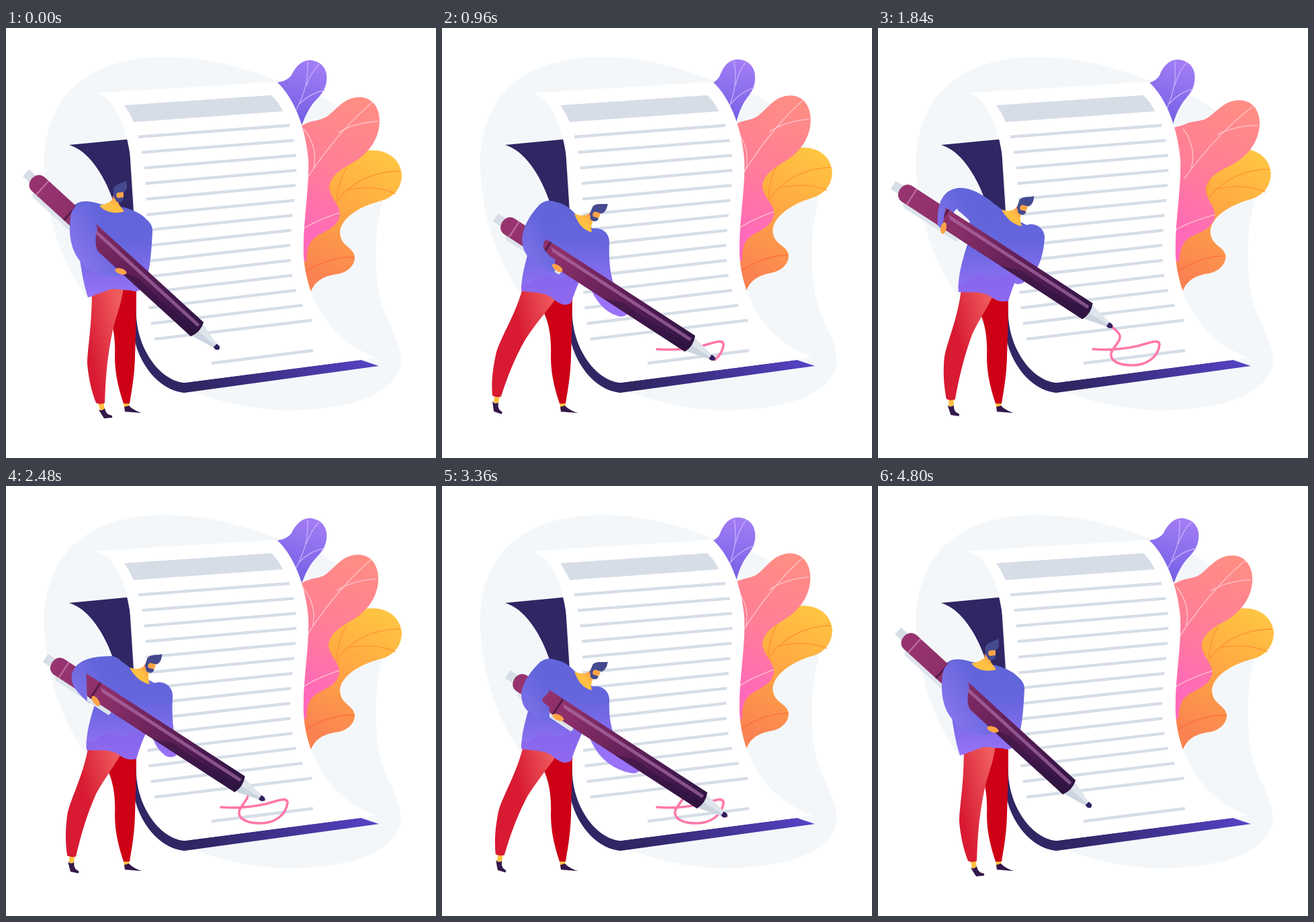
Recreate the animation shown at these times as an HTML page. Size 640x640 px, loop 4840 ms.

```html
<!DOCTYPE html>
<html lang="en">
<head>
<meta charset="utf-8">
<title>Signing a document</title>
<style>
html, body { margin: 0; width: 100%; height: 100%; overflow: hidden; background: #fff; }
svg { display: block; width: 100vw; height: 100vh; }
.vein { fill: none; stroke-width: 1.3; }
.ink { fill: none; stroke: #ff78a9; stroke-linecap: round; stroke-linejoin: round; }
</style>
</head>
<body>
<svg viewBox="0 0 640 640">
  <defs>
    <linearGradient id="gPurple" gradientUnits="userSpaceOnUse" x1="455" y1="50" x2="425" y2="140"><stop stop-color="#a27df5"/><stop offset="1" stop-color="#735fe4"/></linearGradient>
    <linearGradient id="gPink" gradientUnits="userSpaceOnUse" x1="525" y1="110" x2="455" y2="310"><stop stop-color="#ff8d84"/><stop offset=".5" stop-color="#ff7e97"/><stop offset="1" stop-color="#ff69ba"/></linearGradient>
    <linearGradient id="gYellow" gradientUnits="userSpaceOnUse" x1="560" y1="185" x2="465" y2="370"><stop stop-color="#ffc542"/><stop offset=".4" stop-color="#ffad42"/><stop offset="1" stop-color="#fa8252"/></linearGradient>
    <linearGradient id="gBack" gradientUnits="userSpaceOnUse" x1="290" y1="0" x2="550" y2="0"><stop stop-color="#2f2663"/><stop offset="1" stop-color="#5643c6"/></linearGradient>
    <linearGradient id="gShirt" gradientUnits="userSpaceOnUse" x1="0" y1="265" x2="0" y2="402"><stop stop-color="#6064d8"/><stop offset=".4" stop-color="#6666de"/><stop offset="1" stop-color="#9a72f8"/></linearGradient>
    <linearGradient id="gArm" gradientUnits="userSpaceOnUse" x1="88" y1="330" x2="150" y2="290"><stop stop-color="#8a76f0"/><stop offset="1" stop-color="#6265da"/></linearGradient>
    <linearGradient id="gLeg" gradientUnits="userSpaceOnUse" x1="112" y1="440" x2="172" y2="425"><stop stop-color="#d81a32"/><stop offset="1" stop-color="#ee5c5e"/></linearGradient>
    <linearGradient id="gPen" gradientUnits="userSpaceOnUse" x1="-372" y1="0" x2="-40" y2="0"><stop stop-color="#97346f"/><stop offset=".28" stop-color="#8c2f69"/><stop offset=".55" stop-color="#672259"/><stop offset=".8" stop-color="#46194f"/><stop offset="1" stop-color="#2f1542"/></linearGradient>
    <linearGradient id="gSkin" x1="0" y1="1" x2="1" y2="0"><stop offset=".5" stop-color="#ffc043"/><stop offset="1" stop-color="#ff8f4d"/></linearGradient>
    <clipPath id="shirtClip"><path id="shirtEdge"/></clipPath>
    <clipPath id="gripClip"><path id="grip"/></clipPath>
    <g id="penShape">
      <path d="M-362 12H-266Q-261 15 -264 20H-356Q-362 18 -362 12Z" fill="#dde4eb"/>
      <path d="M-389 -7H-368V7H-389Z" fill="#d7dee7"/>
      <path d="M-42 -11L-7 -3.5V3.5L-42 12Z" fill="#dfe5ec"/>
      <path d="M-42 1L-7 0V3.5L-42 12Z" fill="#cbd4df"/>
      <path d="M-8 -3.6H-3Q1 -2 0 1L-3 3.6H-8Z" fill="#32205f"/>
      <path d="M-365 -14H-44Q-37 0 -44 14H-365Q-376 13 -377 0Q-376 -13 -365 -14Z" fill="url(#gPen)"/>
      <path d="M-190 14L-160 3L-110 5L-60 2L-41 4Q-42 10 -44 14Z" fill="#2c123c" opacity=".45"/>
      <path d="M-296 -8H-46V-3H-290Z" fill="#b878b4" opacity=".6"/>
      <path d="M-356 -14V14" stroke="#c77aae" stroke-width="2.5" opacity=".75"/>
      <path d="M-300 -14V14" stroke="#571a48" stroke-width="3"/>
    </g>
  </defs>

  <path fill="#f4f7fa" d="M57 190C62 110 110 45 235 43C330 43 390 75 445 92C520 115 565 190 560 260C545 310 550 380 558 405C566 440 588 465 588 498C580 550 500 569 420 569C340 568 240 540 190 480C150 430 120 410 95 360C70 310 55 250 57 190Z"/>

  <g id="purple">
    <path fill="url(#gPurple)" d="M441 143L425 150L395 84L403 81C412 80 420 77 425 70C432 55 442 47 454 48C470 50 480 62 477 80C474 98 462 105 455 115C448 125 444 135 441 143Z"/>
    <path class="vein" stroke="#c5aefb" d="M449 50C450 80 445 95 432 122M474 93C460 95 445 104 437 113M466 54Q455 64 447 86"/>
  </g>
  <g id="yellow">
    <path fill="url(#gYellow)" d="M454 392C462 372 480 368 495 366C512 362 520 350 519 340C516 325 497 325 497 303C500 280 530 265 555 258C575 254 589 240 589 218C587 195 568 182 545 182C510 182 480 210 470 260L425 330L440 392Z"/>
    <path class="vein" stroke="#ff9236" d="M587 213C545 213 510 230 485 268M580 247C555 235 530 237 508 241M507 208Q496 225 492 255"/>
    <path class="vein" stroke="#ff6c3c" d="M518 341C490 340 465 350 440 366"/>
  </g>
  <g id="pink">
    <path fill="url(#gPink)" d="M425 150L443 144C455 136 470 139 480 130C495 118 505 102 528 103C545 104 556 118 556 138C556 160 545 180 525 195C505 208 484 215 481 237C483 255 497 262 497 278C494 297 475 302 462 310C450 318 448 330 447 347L430 345Z"/>
    <path class="vein" stroke="#ffc3cb" d="M546 110C510 140 480 175 448 224M554 139C530 140 508 147 494 156M443 150C455 165 463 185 458 208M497 275C475 282 455 290 438 302"/>
  </g>

  <path fill="url(#gBack)" d="M94 174L183 165.5L200 430C205 480 235 520 265 528L528 494L555 503L265 543C222 538 190 490 188 440C180 380 168 320 162 265C150 225 125 183 94 174Z"/>
  <path fill="#fff" d="M133 97L403 80C430 105 446 150 450 195C452 240 441 290 443 340C447 400 480 465 551 490L528 494L265 528C230 525 197 480 194 430C192 380 193 290 191 250C186 160 169 105 133 97Z"/>
  <path fill="#d6dde7" d="M176 115L395 100Q407 112 412 124L190 140Q184 126 176 115Z"/>
  <g id="lines" stroke="#d6dde7" stroke-width="4.3"></g>
  <path id="loop" class="ink" stroke-width="3.6" d="M320 478C345 480 370 477 388 473C402 469 418 462 419 471C417 490 400 502 378 502C358 502 345 495 347 484C350 474 362 466 360 458C357 449 345 443 335 437"/>
  <path id="slash" class="ink" stroke-width="2.2" d="M335 437L424 492"/>

  <path fill="#ffc043" d="M175 557H183L184 567H176Z"/>
  <path fill="#34184b" d="M176 564L183 562C190 569 197 571 202 573L177 571Z"/>
  <path fill="#cd0016" d="M150 380H194C194 430 193 460 192 490C191 520 187 540 184 559H175C168 538 162 515 162 490C163 462 160 440 150 420Z"/>
  <g id="foot">
    <path fill="#ffc043" d="M-3 -2H5L7 10L0 11Z"/>
    <path fill="#34184b" d="M-2 10Q3 13 7 8Q8 14 12 17L18 19V22L6 23Q2 17 -2 10Z"/>
  </g>
  <path id="leg" fill="url(#gLeg)"/>
  <path id="rightArm" fill="url(#gShirt)"/>
  <path id="shirt" fill="url(#gShirt)"/>
  <path id="hem" clip-path="url(#shirtClip)" fill="#8763ec" d="M115 379C135 388 143 363 158 369C175 378 185 370 208 360V415H115Z"/>
  <path id="neck" fill="url(#gSkin)"/>
  <g id="head">
    <circle cx="-8" cy="3" r="2.5" fill="#ff8a62"/>
    <rect x="-6" y="-6" width="12" height="11" rx="4" fill="#ffa447"/>
    <path fill="#454a8f" d="M-9 2V-10C-6 -17 4 -18 10 -22C12 -14 11 -8 7 -5L-3 -4C-6 -1 -5 3 -2 4C2 3 5 3 6 4C6 9 1 12 -5 9Q-7 4 -9 2Z"/>
  </g>
  <use id="pen" href="#penShape"/>
  <path id="leftArm" fill="url(#gArm)"/>
  <g id="penFront"><use href="#penShape" clip-path="url(#gripClip)"/></g>
  <ellipse id="hand" rx="9" ry="4.2" fill="#ffa447"/>
</svg>
<script>
const LOOP = 4840, TAU = Math.PI * 2, RAD = Math.PI / 180;
const el = id => document.getElementById(id);
const set = (id, name, value) => el(id).setAttribute(name, value);
const clamp = u => Math.min(1, Math.max(0, u));
const mix = (a, b, k) => a + (b - a) * k;
const ramp = (t, from, to) => {
  const u = clamp((t - from) / (to - from));
  return u * u * (3 - 2 * u);
};
// Starts faster and ends slower as pull grows
const slowing = (t, from, to, pull) => {
  const u = clamp((t - from) / (to - from));
  return u + pull * u * (1 - u);
};

// Rows of text follow the S curve of the sheet
const cubic = (v, a, b, c, d) => a + v * (b + v * (c + v * d));
const rows = Array.from({ length: 14 }, (_, i) => {
  const v = i / 13;
  return `M${cubic(v, 197, 80, -167, 111)} ${162 + 301 * v}L${cubic(v, 422, 104, -318, 247)} ${145 + 290 * v}`;
});
el('lines').innerHTML = `<path d="${rows.join('')}M306 499L457 480"/>`;

// Body poses: upright, bent, leaning
const shirts = [
  'M96 276C98 258 116 254 140 262L176 267C204 275 217 288 217 305C215 330 200 360 194 388C180 395 165 384 150 391C138 395 130 399 122 401C112 370 110 340 108 330C102 312 96 295 96 276Z',
  'M136 275C138 250 158 248 184 270L213 289C236 300 245 314 240 330C224 335 206 365 194 406C184 408 178 407 168 400C155 391 140 394 120 393C118 375 124 350 133 322C139 310 136 290 136 275Z',
  'M147 297C140 258 170 246 197 275L224 298C238 306 247 320 240 334C220 336 206 370 192 409C184 414 178 412 168 405C155 392 140 395 118 391C118 370 124 348 132 322C139 312 146 305 147 297Z'
];
const necks = [
  'M139 264C148 262 158 260 161 250L167 252C166 264 170 264 176 273C164 277 147 275 139 264Z',
  'M184 270C194 274 204 273 209 262L215 272C211 278 211 286 214 295C202 293 190 283 184 270Z',
  'M197 276C207 281 218 280 223 272L229 280C222 290 221 296 223 304C210 301 202 291 197 276Z'
];
const heads = ['169 249 0', '216 268 18', '229 278 23'];
const shoulders = ['118 282 198 302', '155 275 228 312', '160 279 229 318'];
const legs = [
  'M128 385C128 450 121 475 121 500C123 525 129 545 134 558Q141 561 147 558C148 525 150 490 160 445C167 420 172 410 176 380Z',
  'M123 380C114 430 90 465 86 490C82 515 82 530 84 549Q90 552 97 550C105 520 115 490 130 460C145 435 160 418 176 392Z'
];

function blend(poses, ...amounts) {
  const nums = poses.map(p => p.match(/-?[\d.]+/g).map(Number));
  let n = 0;
  return poses[0].replace(/-?[\d.]+/g, () => {
    const v = amounts.reduce((sum, k, j) => sum + k * (nums[j + 1][n] - nums[j][n]), nums[0][n]);
    n++;
    return v.toFixed(2);
  });
}

// Tapered, rounded limb along a quadratic curve
function limb(x0, y0, x1, y1, x2, y2, w0, w1) {
  const left = [], right = [], N = 14;
  for (let i = 0; i <= N; i++) {
    const u = i / N, v = 1 - u, r = mix(w0, w1, u) / 2;
    const x = v * v * x0 + 2 * u * v * x1 + u * u * x2;
    const y = v * v * y0 + 2 * u * v * y1 + u * u * y2;
    const dx = mix(x1 - x0, x2 - x1, u), dy = mix(y1 - y0, y2 - y1, u);
    const d = Math.hypot(dx, dy) || 1, nx = -dy / d * r, ny = dx / d * r;
    left.push(`${x + nx} ${y + ny}`);
    right.unshift(`${x - nx} ${y - ny}`);
  }
  const cap = (w, p) => `A${w / 2} ${w / 2} 0 0 0 ${p}`;
  return `M${left.join('L')}${cap(w1, right[0])}L${right.join('L')}${cap(w0, left[0])}Z`;
}

// Elbow of an arm with two equal bones, bent to the left
function elbow(x0, y0, x1, y1, bone) {
  const dx = x1 - x0, dy = y1 - y0, d = Math.hypot(dx, dy);
  const h = Math.sqrt(Math.max(0, bone * bone - d * d / 4));
  return [(x0 + x1) / 2 - dy / d * h, (y0 + y1) / 2 + dx / d * h];
}

const strokes = ['loop', 'slash'].map(id => ({ node: el(id), len: el(id).getTotalLength() }));

// Reveals the ink and returns the point being written
function drawInk(t) {
  const parts = [slowing(t, 250, 2000, .36), slowing(t, 2000, 3280, .78)];
  strokes.forEach(({ node, len }, i) => {
    node.style.strokeDasharray = `${len * parts[i]} ${len + 20}`;
    node.style.opacity = parts[i] > 0 ? 1 - ramp(t, 4280, 4480) : 0;
  });
  const i = parts[1] > 0 ? 1 : 0;
  return strokes[i].node.getPointAtLength(strokes[i].len * parts[i]);
}

function drawLeaves(t) {
  const wave = TAU * t / (LOOP / 2), sway = 1 - Math.cos(wave);
  set('purple', 'transform', `rotate(${-3.7 * sway} 435 172)`);
  set('yellow', 'transform', `rotate(${-1.3 * sway} 445 420)`);
  set('pink', 'transform', `rotate(${-3.05 * Math.sin(wave)} 445 365)`);
}

function draw(t) {
  drawLeaves(t);

  const back = ramp(t, 4080, 4490), active = ramp(t, 0, 600) - back;
  const lift = ramp(t, 3370, 3850), home = 1 - ramp(t, 0, 250) + back;
  const ink = drawInk(t);
  const x = mix(ink.x - 7 * lift, 317, home), y = mix(ink.y - 30 * lift, 478, home);
  const angle = 42.4 - 9.4 * active - 3.9 * lift * (1 - back);
  const place = `translate(${x} ${y}) rotate(${angle})`;
  set('pen', 'transform', place);
  set('penFront', 'transform', place);

  // The body follows the height of the pen tip
  const lean = active * ramp(y, 470, 491);
  const step = active * (.88 + .0105 * (y - 462) - .16 * t / LOOP);
  const shirt = blend(shirts, active, lean);
  set('shirt', 'd', shirt);
  set('shirtEdge', 'd', shirt);
  set('hem', 'opacity', .6 * active);
  set('neck', 'd', blend(necks, active, lean));
  const [hx, hy, turn] = blend(heads, active, lean).split(' ');
  set('head', 'transform', `translate(${hx} ${hy}) rotate(${turn})`);
  set('leg', 'd', blend(legs, step));
  set('foot', 'transform', `translate(${140 - 50 * step} ${558 - 9 * step}) rotate(${20 * step})`);

  // Both arms reach for points along the pen
  const c = Math.cos(angle * RAD), s = Math.sin(angle * RAD);
  const onPen = (dist, side) => [x - dist * c - side * s, y - dist * s + side * c];
  const [lx, ly, rx, ry] = blend(shoulders, active, lean).split(' ').map(Number);
  const hold = 186 + active * (30 + 75 * ramp(t, 500, 1200) - 42 * lift);
  const [px, py] = onPen(hold, 13);
  const [ex, ey] = elbow(lx, ly, px, py, 70);
  const aim = Math.atan2(py - ey, px - ex);
  set('leftArm', 'd', limb(lx, ly, ex, ey, px - 8 * Math.cos(aim), py - 8 * Math.sin(aim), 44, 19));
  set('hand', 'transform', `translate(${px} ${py}) rotate(${aim / RAD + 8})`);
  const [qx, qy] = onPen(160, 10);
  set('rightArm', 'd', limb(rx, ry, rx, qy - 14, qx, qy, 40, 29));

  // Part of the pen that passes in front of the left arm
  const over = 20 * (ramp(t, 700, 1200) - ramp(t, 1500, 2200));
  const low = hold + 8 - over, top = low + 69 - .4 * (hold - 186) - over;
  set('grip', 'd', `M${-top} -15L9 -15V24H${-low}Z`);
}

const begin = performance.now();
function tick() {
  draw((performance.now() - begin) % LOOP);
  requestAnimationFrame(tick);
}
tick();
</script>
</body>
</html>
```
